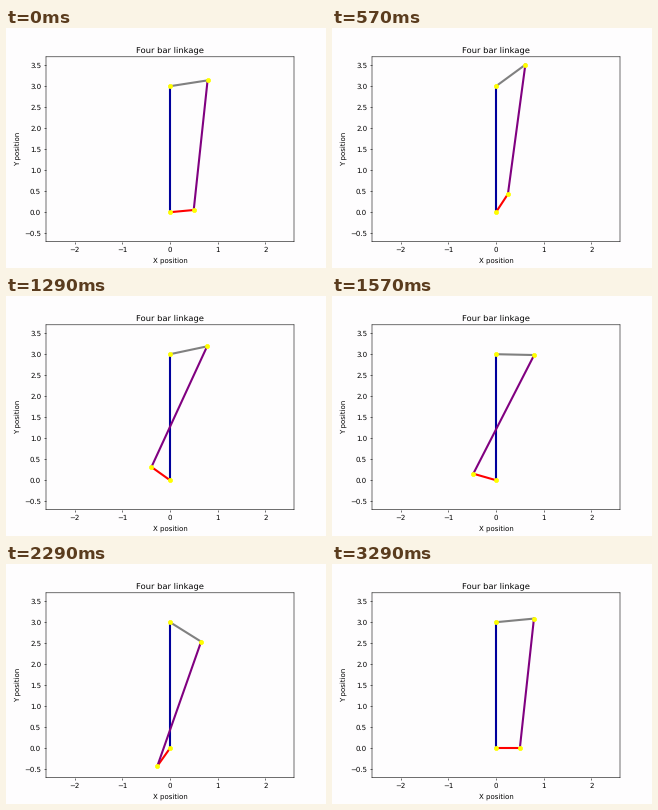
Write a matplotlib script that moves like this. It is 320 px wide and 240 px high and loops after 3440 ms.

```python
import numpy as np
import matplotlib.pyplot as plt
from matplotlib.animation import FuncAnimation

LOOP_MS, TICK_MS = 3440, 20
STEPS_PER_SECOND = 7
GROUND, CRANK, COUPLER, ROCKER = 3.0, 0.5, 3.1, 0.8
PAPER = "#fefdfe"

# Crank angle in degrees at each step; it turns fastest near the rocker's ends.
CRANK_DEG = [6, 14, 26, 39.5, 60, 90, 103, 117, 131, 141, 151, 162,
             174, 186, 202, 217.6, 238, 263, 288, 308, 322, 335, 349, 360]

O = np.array([0.0, 0.0])
C = np.array([0.0, GROUND])


def joints(deg):
    """Return the crank pin and the rocker pin for one crank angle."""
    t = np.radians(deg)
    a = CRANK * np.array([np.cos(t), np.sin(t)])
    d = C - a
    dist = np.hypot(*d)
    u = d / dist
    along = (COUPLER**2 - ROCKER**2 + dist**2) / (2 * dist)
    off = np.sqrt(COUPLER**2 - along**2)
    b = a + along * u + off * np.array([u[1], -u[0]])
    return a, b


plt.rcParams.update({"font.family": "DejaVu Sans", "text.hinting": "none"})
fig, ax = plt.subplots(figsize=(6.4, 4.8), dpi=50, facecolor=PAPER)
ax.set_facecolor(PAPER)
ax.set(xlim=(-2.6, 2.6), ylim=(-0.7, 3.7), title="Four bar linkage",
       ylabel="Y position")
ax.set_xlabel("X position", labelpad=5.5)

# Soft, unsnapped frame lines.
for spine in ax.spines.values():
    spine.set_snap(False)


def bar(color):
    return ax.plot([], [], color=color, lw=3)[0]


ground, crank, coupler, rocker = map(bar, ("#00009c", "red", "purple", "gray"))
pins, = ax.plot([], [], "o", color="yellow", ms=6, zorder=3)


def update(i):
    # The quarter-tick-early sampling keeps each change on its nearest tick.
    step = int((i + 0.75) * TICK_MS * STEPS_PER_SECOND / 1000)
    a, b = joints(CRANK_DEG[min(step, len(CRANK_DEG) - 1)])
    for line, pts in ((ground, (O, C)), (crank, (O, a)), (coupler, (a, b)),
                      (rocker, (b, C)), (pins, (O, a, b, C))):
        line.set_data(*np.transpose(pts))
    return ground, crank, coupler, rocker, pins


anim = FuncAnimation(fig, update, frames=LOOP_MS // TICK_MS,
                     interval=TICK_MS, repeat=True, repeat_delay=0)
plt.show()
```
